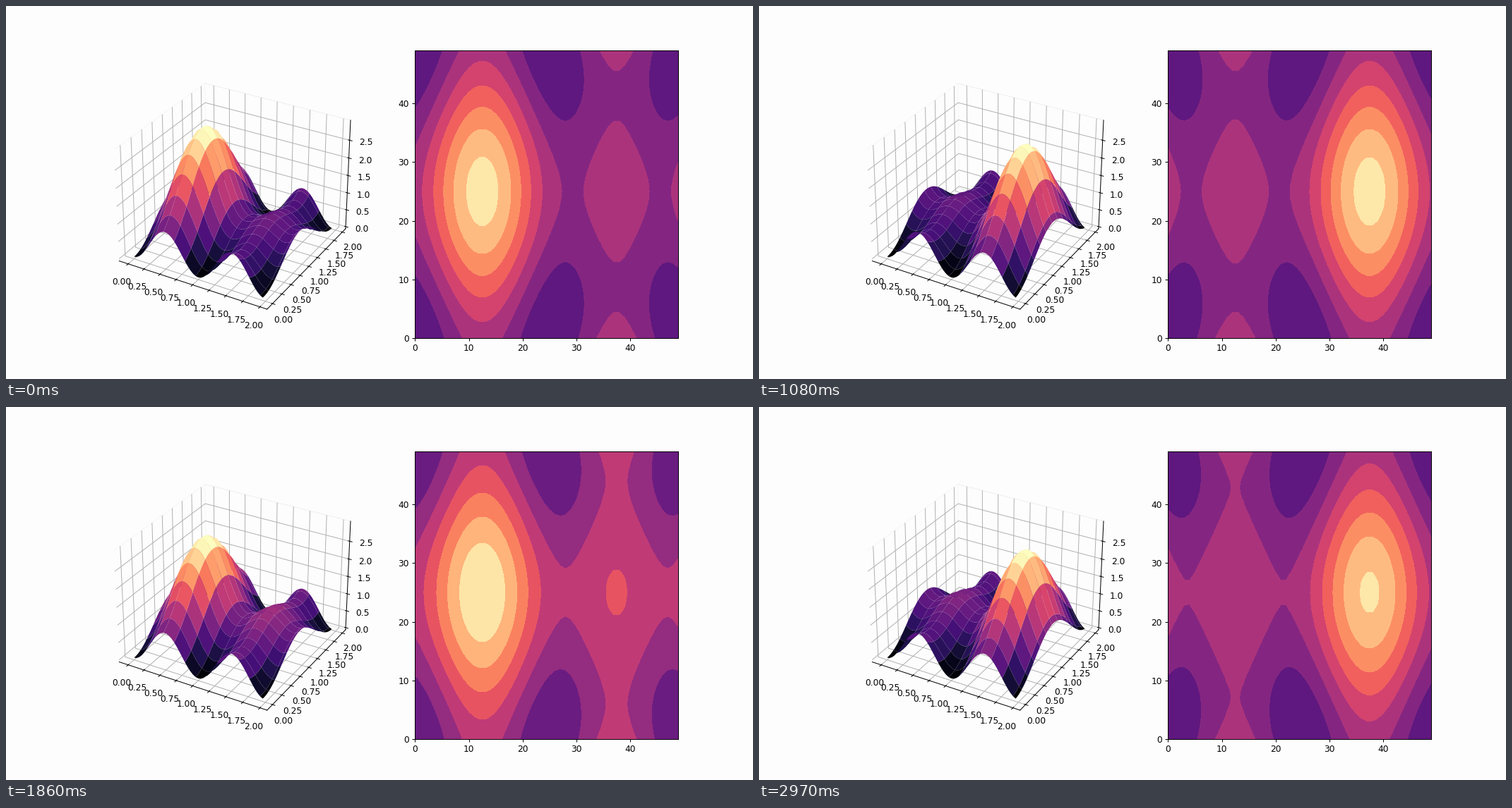
Write a matplotlib script that moves like this. It is 1058 by 529 pixels and loops after 3000 ms.

```python
import numpy as np
import matplotlib.pyplot as plt
from matplotlib.animation import FuncAnimation
from matplotlib.ticker import MaxNLocator

FRAMES, INTERVAL = 100, 30
OMEGA = 3.0  # beat frequency, rad/s
PAPER = "#fdfdfd"

axis = np.arange(50) * 0.04
X, Y = np.meshgrid(axis, axis)
A = np.sin(np.pi * X)
B = np.sin(np.pi * Y / 2)

fig = plt.figure(figsize=(12, 6), dpi=88.1667, facecolor=PAPER)
ax3d = fig.add_subplot(1, 2, 1, projection="3d", facecolor=PAPER)
ax2d = fig.add_subplot(1, 2, 2)
for side in (ax3d.xaxis, ax3d.yaxis, ax3d.zaxis):
    side.pane.fill = False

drawn = []


def density(t):
    return A**2 + B**2 + A * B * np.cos(OMEGA * t)


def draw(i):
    while drawn:
        drawn.pop().remove()
    z = density(i * INTERVAL / 1000)
    levels = MaxNLocator(8, min_n_ticks=1).tick_values(z.min(), z.max())
    drawn.append(ax3d.plot_surface(X, Y, z, rstride=4, cstride=4, cmap="magma"))
    drawn.append(ax2d.contourf(z, levels=levels, cmap="magma",
                               vmin=-1, vmax=levels[-1]))
    return drawn


# The first surface is the tallest: its limits hold for the whole loop.
draw(0)
ax3d.autoscale(False)
ax3d.set_xticks(np.arange(0, 2.1, 0.25))
ax3d.set_yticks(np.arange(0, 2.1, 0.25))
ax3d.set_zticks(np.arange(0, 2.6, 0.5))

anim = FuncAnimation(fig, draw, frames=FRAMES, interval=INTERVAL,
                     init_func=lambda: drawn, repeat=True, repeat_delay=0)
plt.show()
```
